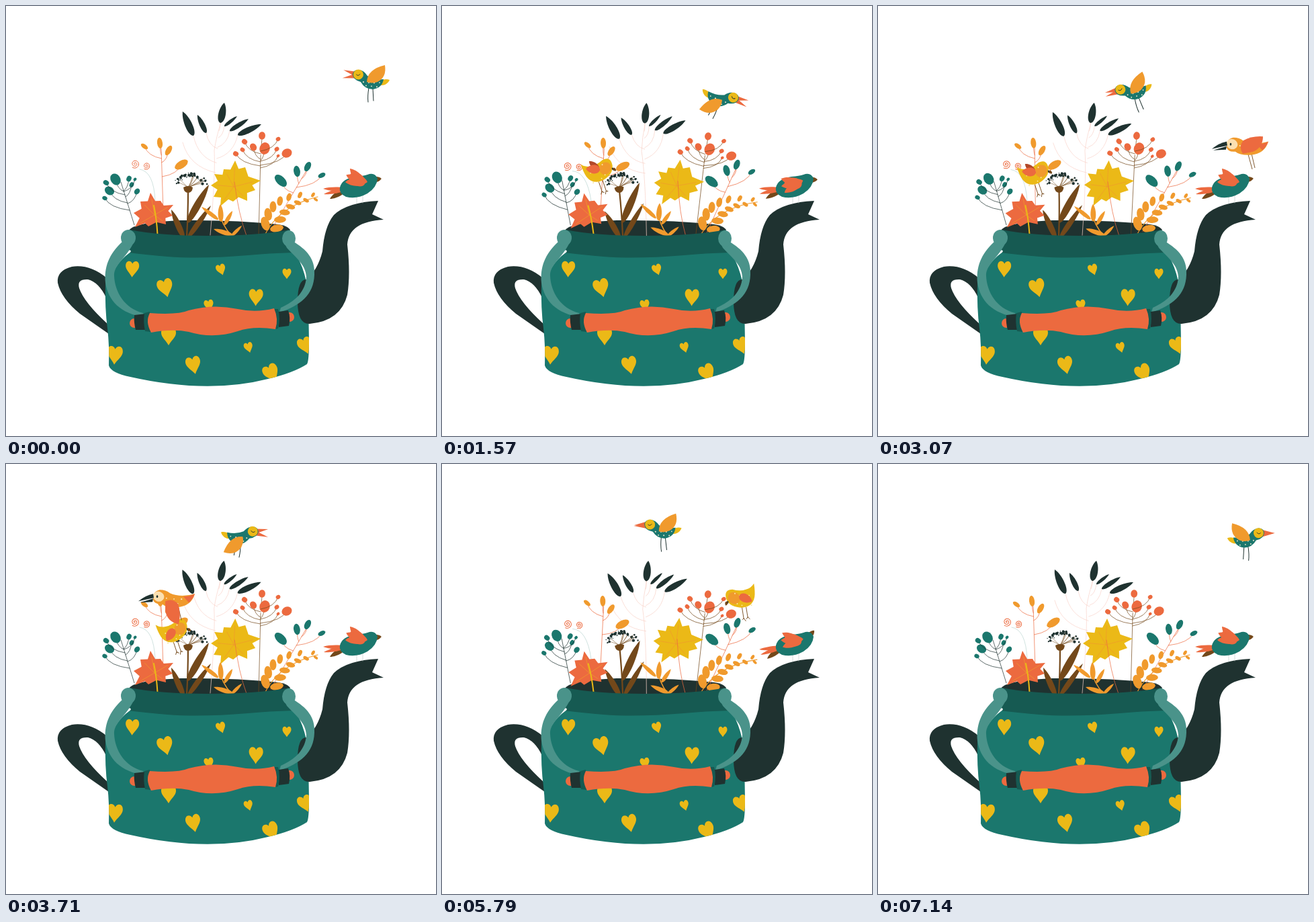
Write an HTML page with a canvas that moves like this. It is 640 px wide and 640 px high and loops after 7.21 s.

```html
<!DOCTYPE html>
<html>
<head>
<meta charset="utf-8">
<style>
html, body { margin: 0; width: 100%; height: 100%; overflow: hidden; background: #fff; }
canvas { display: block; width: 100vmin; height: 100vmin; }
</style>
</head>
<body>
<canvas id="c" width="640" height="640"></canvas>
<script>
const ctx = document.getElementById('c').getContext('2d');
const LOOP = 7210, TAU = Math.PI * 2, RAD = Math.PI / 180;
const DARK = '#1f3230', TEAL = '#1b776d', NECK = '#165a52', BAND = '#4a938a';
const RED = '#ec6a3f', ORANGE = '#f09a2d', YELLOW = '#ebb917', BROWN = '#73481a';
const PINK = '#f9d3ca', CREAM = '#fbe0b0', RUST = '#b2492a';

const mix = (a, b, u) => a + (b - a) * u;
const random = n => { const v = Math.sin(n * 12.99 + 4) * 43758.5; return v - Math.floor(v); };

function fill(d, color) {
  ctx.fillStyle = color;
  ctx.fill(new Path2D(d));
}

function line(d, color, w = 0.7) {
  ctx.strokeStyle = color;
  ctx.lineWidth = w;
  ctx.lineCap = 'round';
  ctx.stroke(new Path2D(d));
}

function oval(color, x, y, rx, ry = rx, deg = 0) {
  ctx.fillStyle = color;
  ctx.beginPath();
  ctx.ellipse(x, y, rx, ry, deg * RAD, 0, TAU);
  ctx.fill();
}

function turn(x, y, deg, draw) {
  ctx.save();
  ctx.translate(x, y);
  ctx.rotate(deg * RAD);
  ctx.translate(-x, -y);
  draw();
  ctx.restore();
}

// Pointed at the tip (x1, y1), fuller towards the foot (x2, y2)
function leaf(color, x1, y1, x2, y2, w) {
  const dx = x2 - x1, dy = y2 - y1, len = Math.hypot(dx, dy);
  const at = (f, s) => `${x1 + dx * f - dy / len * w * s} ${y1 + dy * f + dx / len * w * s} `;
  fill(`M${x1} ${y1}C${at(0.3, 0.66)}${at(0.95, 0.66)}${x2} ${y2}C${at(0.95, -0.66)}${at(0.3, -0.66)}${x1} ${y1}Z`, color);
}

// Joins (x, y) to a straight main stem; returns the joint
function twig(color, [rx, ry, tx, ty], x, y, drop) {
  const jy = y + drop, jx = mix(rx, tx, (ry - jy) / (ry - ty));
  line(`M${jx} ${jy}Q${mix(jx, x, 0.8)} ${jy - drop * 0.2} ${x} ${y}`, color);
  return [jx, jy];
}

// A stem carrying round or slim ends, each [x, y, size]
function spray(color, stemColor, stem, slim, ends) {
  const [rx, ry, tx, ty] = stem;
  line(`M${rx} ${ry}L${tx} ${ty}`, stemColor);
  for (const [x, y, r] of ends) {
    const [jx, jy] = twig(stemColor, stem, x, y, 18);
    oval(color, x, y, r, r * slim, Math.atan2(y - jy, x - jx) / RAD);
  }
}

// Toothed leaf: valleys lie between tips, pulled to the centre
function toothed(color, vein, cx, cy, pull, tips) {
  const n = tips.length;
  const points = tips.map(([x, y], i) => {
    const [x2, y2] = tips[(i + 1) % n];
    return `${x} ${y}L${mix(cx, (x + x2) / 2, pull)} ${mix(cy, (y + y2) / 2, pull)}`;
  });
  fill(`M${points.join('L')}Z`, color);
  tips.forEach(([x, y], i) => {
    if (i % 2 === 0) line(`M${cx} ${cy + 3}L${mix(cx, x, 0.7)} ${mix(cy, y, 0.7)}`, vein);
  });
}

function spiral(x, y, r) {
  ctx.beginPath();
  for (let a = 0; a < 15; a += 0.25)
    ctx.lineTo(x + Math.cos(a) * r * a / 15, y + Math.sin(a) * r * a / 15);
  ctx.strokeStyle = RED;
  ctx.lineWidth = 1;
  ctx.stroke();
}

function branch() {
  const stem = [304, 341, 318, 176];
  line('M304 341Q312 250 310 215Q313 195 320 173', PINK);
  const leaves = [[263, 157, 279, 193, 11], [285, 162, 298, 189, 8], [325, 144, 319, 174, 11], [344, 164, 325, 179, 5], [361, 168, 333, 186, 7], [380, 176, 345, 192, 9]];
  for (const [x1, y1, x2, y2, w] of leaves) {
    twig(PINK, stem, x2, y2, 8 + Math.abs(x2 - 315) * 0.9);
    leaf(DARK, x1, y1, x2, y2, w);
  }
  twig(PINK, stem, 263, 203, 45);
}

function curls() {
  line('M199 243Q220 246 222 290', '#bcd6d2');
  spiral(192, 235, 6.5);
  spiral(209, 238, 5.5);
}

function umbel() {
  leaf(BROWN, 302, 266, 270, 323, 11);
  leaf(BROWN, 246, 303, 265, 346, 9);
  leaf(BROWN, 305, 297, 270, 346, 8);
  line('M271 274Q271 310 269 343', BROWN, 2.2);
  fill('M264 270Q271 266 278 270Q277 278 271 278Q265 278 264 270Z', BROWN);
  for (let i = 0; i < 55; i++) {
    const a = -Math.PI * random(i), d = 0.68 + 0.34 * random(i + 99);
    const x = 275 + Math.cos(a) * 25 * d, y = 267 + Math.sin(a) * 18 * d;
    if (i % 5 === 0) line(`M271 270Q${mix(271, x, 0.6)} 264 ${x} ${y}`, BROWN, 0.5);
    oval(DARK, x, y, 0.7 + 1.5 * random(i + 200) ** 3);
  }
}

function maple() {
  toothed(RED, ORANGE, 221, 308, 0.74, [[215, 278], [230, 290], [249, 296], [248, 312], [238, 325], [212, 328], [192, 329], [190, 308], [200, 291]]);
  line('M220 297Q224 315 225.5 340', YELLOW, 2);
}

function starLeaf() {
  toothed(YELLOW, ORANGE, 339, 266, 0.76, [[341, 230], [356, 240], [379, 260], [371, 274], [359, 290], [338, 291], [319, 298], [309, 284], [305, 267], [310, 250], [324, 243]]);
  line('M340 262Q346 310 358 342', RED);
}

// Two rows of leaves shrinking along a curve
function fern() {
  line('M384 343Q405 298 464 284', ORANGE, 1.1);
  const curve = (a, b, c, u) => mix(mix(a, b, u), mix(b, c, u), u);
  for (let i = 0; i < 7; i++) {
    const u = i / 6, size = mix(10.5, 3.8, u);
    oval(ORANGE, curve(386, 394, 457, u), curve(324, 278, 281, u), size * 0.6, size, mix(-18, 32, u));
    oval(ORANGE, curve(403, 415, 461, u), curve(331, 288, 288, u), size * 0.95, size * 0.52, mix(-10, 38, u));
  }
}

function tuft() {
  line('M336 342Q320 325 318 306', ORANGE, 1.5);
  leaf(ORANGE, 319, 295, 320, 321, 8);
  leaf(ORANGE, 291, 299, 316, 318, 6);
  leaf(ORANGE, 337, 305, 325, 326, 6);
  leaf(ORANGE, 309, 332, 337, 341, 7);
  leaf(ORANGE, 351, 327, 335, 343, 5);
}

// Pivot, swing in degrees, lead in ms, drawing
const plants = [
  [316, 338, -6.2, 70, branch],
  [222, 290, -6.2, 0, curls],
  [235, 326, 5.4, 0, () => spray(ORANGE, RED, [234, 305, 231, 212], 0.5, [[229, 204, 8], [206, 209, 6], [242, 215, 8], [261, 236, 11]])],
  [192, 328, 6.9, 0, () => spray(TEAL, DARK, [191, 326, 171, 262], 0.8, [[163, 258, 9], [154, 275, 7.5], [149, 263, 4.5], [183, 257, 4.5], [187, 266, 4], [192, 258, 2.7], [195, 276, 4.8], [147, 286, 3.8]])],
  [378, 360, 5.5, -60, () => spray(RED, BROWN, [376, 342, 379, 222], 0.85, [[381, 193, 5.8], [355, 202, 4.3], [368, 210, 5.7], [385, 212, 9], [405, 198, 3.5], [418, 219, 7.7], [403, 213, 3.6], [405, 223, 2.5], [352, 214, 3.6], [342, 220, 4.2]])],
  [417, 335, -6.3, 0, () => spray(TEAL, RED, [394, 335, 447, 245], 0.58, [[433, 246, 8.3], [449, 239, 7.6], [470, 252, 5.8], [409, 260, 11]])],
  [362, 400, 4.7, 30, starLeaf],
  [268, 342, -6.2, 0, umbel],
  [225, 338, -3.6, 0, maple],
  [390, 340, 6, 0, fern],
  [336, 345, 5.8, 0, tuft]
];

const bodyPath = 'M184 362Q151 383 148 412Q147 450 151 480Q154 505 153 535Q156 546 185 552Q300 578 390 555Q428 546 448 533Q451 528 451 500L450 440Q449 395 428 364Z';
const hearts = [[188, 391, 20, 2], [237, 419, 23, -14], [320, 392, 14, -18], [418, 398, 13, 0], [372, 433, 21, 2], [302, 445, 14, -10], [242, 491, 22, 0], [162, 519, 23, 4], [279, 534, 22, -12], [361, 508, 13, -16], [445, 505, 21, -20], [395, 546, 23, -28]];

function heart(x, y, w, deg) {
  ctx.save();
  ctx.translate(x, y);
  ctx.rotate(deg * RAD);
  ctx.scale(w, w);
  fill('M0-.36C-.12-.66-.52-.62-.5-.18C-.48.1-.18.32 0 .64C.18.32.48.1.5-.18C.52-.62.12-.66 0-.36Z', YELLOW);
  ctx.restore();
}

function kettleBack() {
  fill('M150 405Q125 384 98 388Q75 394 77 412Q82 435 110 458L153 488L151 473Q116 441 109 420Q105 406 122 407Q138 411 149 434Z', DARK);
  fill(bodyPath, TEAL);
  ctx.save();
  ctx.clip(new Path2D(bodyPath));
  hearts.forEach(h => heart(...h));
  ctx.restore();
  fill('M183 334Q190 322 260 319Q340 318 405 325Q419 327 423 333L415 346L190 346Z', DARK);
}

function kettleFront() {
  fill('M184 333Q230 342 300 342Q375 342 422 333L428 367Q390 368 360 371Q290 377 240 373Q205 370 182 367Z', NECK);
  fill('M554 290L545 310L562 318Q510 321 508 355Q513 400 508 430Q498 469 452 473Q434 474 434 440Q434 407 447 407Q464 393 471 365Q474 328 488 311Q508 292 554 290Z', DARK);
  line('M162 388Q170 375 184 365', '#fff', 3.5);
  line('M430 366Q441 376 448 394', '#fff', 3);
  fill('M174 350C152 370 146 390 148 412C152 438 170 458 206 463L204 457C176 450 162 425 161 402C160 385 180 374 190 352Z', BAND);
  fill('M430 352C452 366 460 380 459 400C458 430 438 446 407 456L409 449C430 440 446 425 447 403C446 385 432 375 418 360L413 350Z', BAND);
  oval(BAND, 182, 345, 11, 12);
  oval(BAND, 421, 346, 10, 12);
  oval(RED, 191, 472, 7, 7);
  oval(RED, 422, 463, 7, 7);
  fill('M191 460L208 458L209 482L193 482Q190 471 191 460Z', DARK);
  fill('M406 455L420 453Q424 464 421 476L406 478Z', DARK);
  fill('M206 457L214 455L215 485L207 484Q204 470 206 457Z', NECK);
  fill('M400 451L405 451Q409 465 405 480L399 481Z', NECK);
  fill('M214 457Q256 460 272 453Q308 443 345 451Q372 457 399 450Q406 466 401 481Q368 476 345 484Q308 496 272 485Q248 480 216 486Q207 470 214 457Z', RED);
}

// 0 at rest, 1 at the far end of the sway
const sway = t => 0.5 - 0.5 * Math.cos(2 * TAU * t / LOOP);

function perchedBird(t) {
  const s = sway(t), nod = -60 * Math.sin(3.8 * s ** 4);
  line('M522 283V294M531 282V293', '#c5cfcd');
  turn(506, 272, nod / 6, () => {
    leaf(BROWN, 482, 287, 506, 273, 8);
    leaf(RED, 472, 272, 508, 273, 6);
    leaf(RED, 473, 280, 508, 272, 6);
  });
  turn(544, 259, nod - 8, () => leaf(BROWN, 559, 259, 544, 259, 8));
  fill('M497 270Q500 257 520 254Q532 253 538 251Q549 247 553 257Q552 270 538 279Q522 288 506 284Q495 279 497 270Z', TEAL);
  turn(534, 262, -42 * s ** 6, () => {
    oval(RED, 523, 258, 13, 9, 35);
    for (let i = 0; i < 3; i++) turn(530, 262, 48 - 24 * i, () => leaf(RED, 503 + i, 262, 534, 262, 12));
    leaf(RED, 538, 262, 514, 256, 14);
  });
}

// Moves a left-facing drawing centred on (ox, oy); tilt > 0 points the beak down
function place(x, y, tilt, right, ox, oy, draw) {
  ctx.save();
  ctx.translate(x, y);
  if (right) ctx.scale(-1, 1);
  ctx.rotate(-tilt * RAD);
  ctx.translate(-ox, -oy);
  draw();
  ctx.restore();
}

function speckle(n, x, y, w, h, color) {
  for (let i = 0; i < n; i++)
    oval(color, x + w * (i + 0.5) / n, y + h * (i % 2 + random(i) * 0.4), 0.8 + 0.4 * random(i + 7));
}

// Flies to the left and back three times per loop, dipping midway
function singer(t) {
  const lap = LOOP / 3, out = 1180, u = t % lap, back = u > out;
  const e = Math.sin(Math.PI / 2 * (back ? (u - out) / (lap - out) : u / out)) ** 1.25;
  const away = back ? 1 - e : e, dip = Math.sin(Math.PI * e), gape = 1 - e * e;
  const beat = Math.max(-1, Math.min(1, 2.6 * Math.cos(TAU * (16 * t / LOOP + 0.08))));
  place(mix(546, 322, away), mix(107, 88, away) + 38 * dip, 26 * dip, back, 546, 107, () => {
    line('M540 122Q538 134 539 143M546 122L547 141', DARK, 1);
    turn(519, 102, 22 * gape, () => fill('M520 97L501 102L518 104Z', RED));
    turn(519, 102, -16 * gape, () => fill('M519 101L500 102L520 108Z', RED));
    leaf(YELLOW, 571, 110, 556, 116, 8);
    fill('M516 101Q518 94 526 95Q533 96 538 104Q548 110 562 109Q560 122 546 124Q534 124 528 113Q516 110 516 101Z', TEAL);
    oval(YELLOW, 524.5, 102, 7.5);
    line('M521.5 102Q524 105 527 101.5', DARK, 0.9);
    speckle(7, 530, 112, 28, 6, '#f3ead0');
    turn(538, 113, 45 * (1 - beat), () => fill('M537 113Q538 94 564 88Q567 106 553 113Q544 116 537 113Z', ORANGE));
  });
}

const down = t => -Math.sin(TAU * 17 * t / LOOP);
const span = (t, a, b) => Math.max(0, Math.min(1, (t - a) / (b - a)));
const easeOut = u => 1 - (1 - u) ** 1.4;

// Lands on a twig, leaves to the right, later crosses to the left
function yellowBird(t) {
  const right = t < 5000;
  let x, y;
  if (t < 3560) {
    const u = easeOut(span(t, 200, 1000));
    x = mix(-40, 234, u);
    y = mix(405, 243, u) + 4 * span(t, 1600, 2500);
  } else if (right) {
    const u = span(t, 3560, 4650) ** 1.75;
    x = mix(236, 680, u);
    y = mix(249, 170, u);
  } else {
    const u = easeOut(span(t, 5365, 7110));
    x = mix(675, -40, u);
    y = mix(207, 175, u);
  }
  const perched = t > 1000 && t < 3560, wing = perched ? -32 : -5 + 35 * down(t);
  place(x, y, right ? -28 : 0, right, 455, 197, () => {
    line('M458 212L461 231M464 211L467 229M459 232L461 230L464 234M465 231L467 228L470 231', BROWN, 0.9);
    fill('M434 197Q433 187 444 187Q456 190 464 187Q472 185 476 178Q478 190 477 198Q474 214 456 214Q436 212 434 197Z', YELLOW);
    if (wing < 0) turn(456, 196, wing - 36, () => leaf(RUST, 474, 196, 455, 196, 9));
    oval(ORANGE, 446.5, 200, 9.5, 8.5, 30);
    oval(DARK, 437, 206, 1.2, 2);
    leaf(BROWN, 434, 211, 436, 205, 4);
    speckle(8, 446, 190, 28, 17, '#fbe9a5');
    turn(456, 197, wing, () => leaf(RED, 475, 197, 454, 197, 13));
  });
}

function orangeBird(t) {
  const u = span(t, 2740, 4330);
  place(mix(695, -50, u), mix(213, 192, u), 0, false, 240, 200, () => {
    line('M256 211L261 232M251 212L257 234', BROWN, 0.9);
    fill('M219 202Q218 189 229 187Q238 187 244 192Q260 199 281 193Q276 211 255 213Q239 214 232 208Q221 209 219 202Z', ORANGE);
    fill('M264 197Q273 197 281 193Q278 201 272 206Z', RED);
    oval(CREAM, 227, 197, 8.5, 7.5, 20);
    fill('M197 204Q208 195 219 193L220 199Z', DARK);
    fill('M199 206L219 200L218 205Z', DARK);
    oval(DARK, 225, 197, 1.3, 2);
    speckle(5, 236, 198, 28, 8, '#fde6c0');
    turn(243, 205, -50 * (1 - down(t)), () => fill('M237 204Q248 199 256 208Q261 222 257 238Q240 235 237 218Z', RED));
  });
}

function draw(t) {
  ctx.fillStyle = '#fff';
  ctx.fillRect(0, 0, 640, 640);
  kettleBack();
  for (const [x, y, deg, lead, paint] of plants) turn(x, y, deg * sway(t + lead), paint);
  kettleFront();
  perchedBird(t);
  yellowBird(t);
  orangeBird(t);
  singer(t);
}

const start = performance.now();
function tick() {
  draw((performance.now() - start) % LOOP);
  requestAnimationFrame(tick);
}
tick();
</script>
</body>
</html>
```
